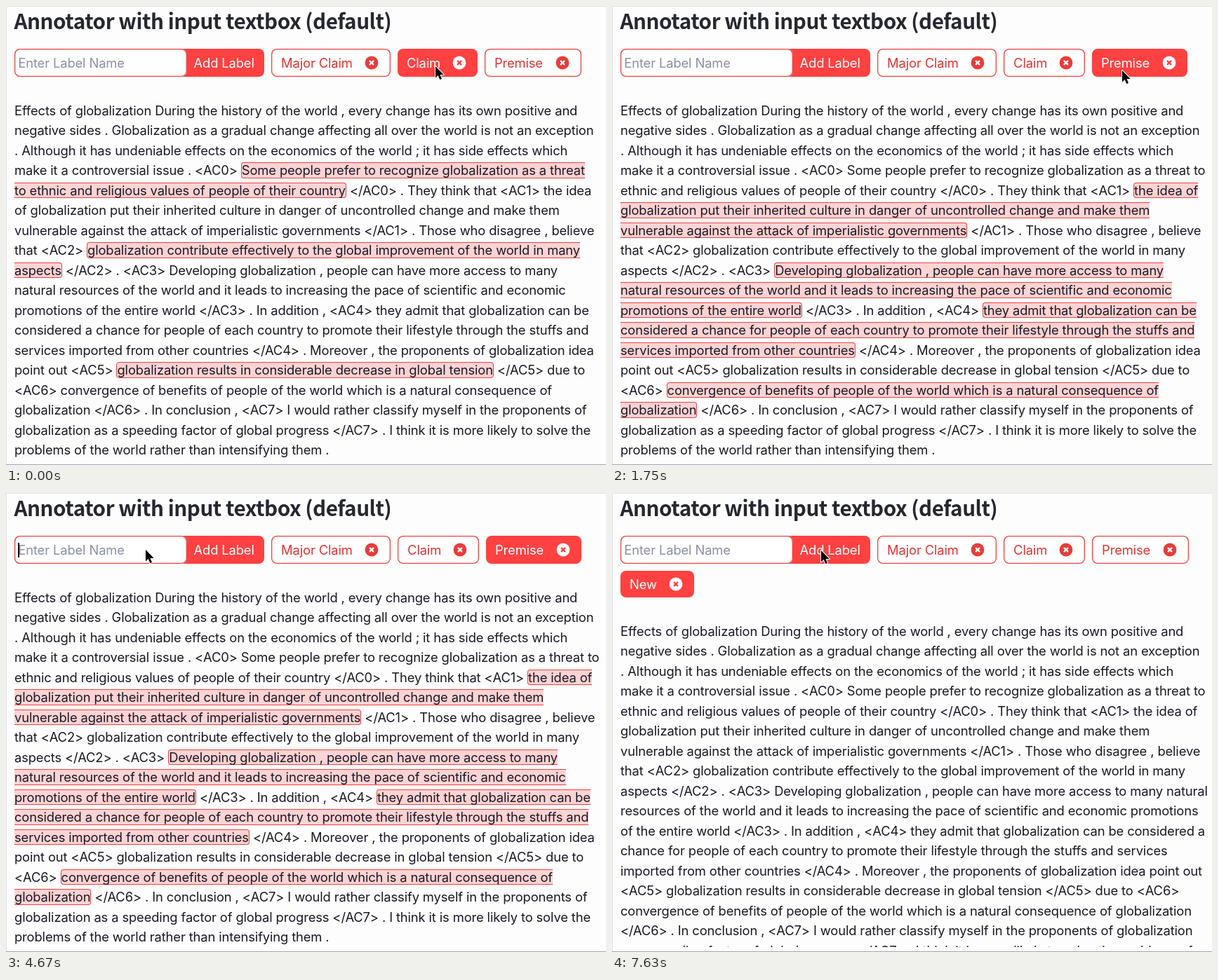
Recreate the animation shown at these times as an HTML page. Size 855 by 655 pixels, loop 7670 ms.

```html
<!DOCTYPE html>
<html lang="en">
<head>
<meta charset="utf-8">
<title>Annotator</title>
<style>
  :root { --red: #ff4141; --line: #ee4340; }
  html, body { margin: 0; width: 100%; height: 100%; overflow: hidden; background: #fdfdfd; }
  #stage {
    position: relative; width: 855px; height: 655px; overflow: hidden;
    font: 18.4px/28.53px Inter, "Liberation Sans", sans-serif;
    font-optical-sizing: none; font-feature-settings: "calt" 0;
    letter-spacing: -0.147px; color: #1a1a26; white-space: pre;
  }
  #stage > * { position: absolute; box-sizing: border-box; }
  #frame { inset: 0; border: solid #e2e1e8; border-width: 1px 0 0 1px; }
  #frame::after { content: ""; position: absolute; left: -1px; right: 0; bottom: 0; height: 1px; background: #a5a2ba; }
  #title { left: 0; top: 0; }
  #title text {
    font: 700 29.7px "Noto Sans CJK JP", "Noto Sans CJK SC", "Noto Sans", sans-serif;
    letter-spacing: -0.5px; fill: #262730;
  }
  #entry { left: 12px; top: 61px; width: 356px; height: 40px; border-radius: 8px; background: var(--red); line-height: 40px; color: #fff; }
  #entry span { position: absolute; left: 255.5px; }
  #field {
    position: absolute; left: 0; top: 0; width: 246px; height: 40px; box-sizing: border-box;
    padding-left: 5.3px; border-radius: 8px; background: #fff;
    box-shadow: inset 0 0 0 1.3px var(--line); color: #000;
  }
  #field.empty { color: #8b90a2; }
  #caret { position: absolute; top: 10px; width: 1.5px; height: 21px; background: #000; }
  .chip {
    height: 40px; line-height: 40px; padding-left: 14.1px; border-radius: 8px;
    color: #e33432; background: #fff; box-shadow: inset 0 0 0 1.3px var(--line);
  }
  .chip svg { position: absolute; right: 17.1px; top: calc(50% - 10px); }
  .chip circle { fill: #e93b39; }
  .chip path { stroke: #fff; stroke-width: 2.3; stroke-linecap: round; }
  .chip.fill { color: #fff; background: var(--red); box-shadow: none; }
  .chip.fill circle { fill: #fff; }
  .chip.fill path { stroke: var(--red); }
  .chip.picked { padding-left: 13px; }
  .chip.picked svg { right: 16px; }
  .page { left: 12px; right: 0; overflow: hidden; }
  .page p { margin: 0; height: 28.53px; }
  .page b {
    display: inline-block; box-sizing: border-box; height: 22.4px; line-height: 20.4px;
    font-weight: 400; background: #fdd3d3; border: solid var(--line); border-width: 1px 0;
  }
  .page b.start { border-left-width: 1px; border-radius: 4px 0 0 4px; }
  .page b.end { border-right-width: 1px; border-radius: 0 4px 4px 0; }
  .page b.start.end { border-radius: 4px; }
  #mouse { left: 0; top: 0; overflow: visible; }
  #mouse path { fill: #000; stroke: #fff; stroke-width: 2; stroke-linejoin: round; paint-order: stroke; }
</style>
</head>
<body>
<div id="stage">
  <div id="frame"></div>
  <svg id="title" width="855" height="50"><text x="11.5" y="33">Annotator with input textbox (default)</text></svg>
  <div id="entry"><span>Add Label</span><div id="field"></div></div>
</div>
<script>
const LOOP = 7670, PICK = 1450, FOCUS = 4200, ADD = 7400, HOVER_LAG = 60;
const KEYS = [[5150, "N"], [5400, "Ne"], [5800, "New"]];

// Pointer stops: time, x, y
const PATH = [
  [150, 612, 86], [900, 700, 98], [1300, 727, 92], [1800, 727, 92], [2350, 727, 96],
  [3580, 199, 81], [6350, 199, 81], [7050, 298, 82]
];

// "|012" ends a line in the layouts whose digits it holds
const TEXT = `Effects of globalization During the history of the world , every change has its own positive and |012
negative sides . Globalization as a gradual change affecting all over the world is not an exception |012
. Although it has undeniable effects on the economics of the world ; it has side effects which |012
make it a controversial issue . <AC0> Some people prefer to recognize globalization as a threat |0 to |12
ethnic and religious values of people of their country </AC0> . They think that <AC1> the idea |0 of |12
globalization put their inherited culture in danger of uncontrolled change and make them |012
vulnerable against the attack of imperialistic governments </AC1> . Those who disagree , believe |012
that <AC2> globalization contribute effectively to the global improvement of the world in many |012
aspects </AC2> . <AC3> Developing globalization , people can have more access to many |01 natural |2
resources of the world and it leads to increasing the pace of scientific and economic |01 promotions |2
of the entire world </AC3> . In addition , <AC4> they admit that globalization can be |01 considered a |2
chance for people of each country to promote their lifestyle through the stuffs and |01 services |2
imported from other countries </AC4> . Moreover , the proponents of globalization idea |01 point out |2
<AC5> globalization results in considerable decrease in global tension </AC5> due to |01 <AC6> |2
convergence of benefits of people of the world which is a natural consequence of |01 globalization |2
</AC6> . In conclusion , <AC7> I would rather classify myself in the proponents of |01 globalization |2
as a speeding factor of global progress </AC7> . I think it is more likely to solve the |01 problems of |2
the world rather than intensifying them .`;

const stage = document.getElementById("stage");
const field = document.getElementById("field");

function add(parent, tag, cls = "") {
  const el = document.createElement(tag);
  el.className = cls;
  parent.append(el);
  return el;
}

function makePage(layout, marked, top) {
  const page = add(stage, "div", "page");
  page.style.top = top + "px";
  page.style.height = 648.3 - top + "px";
  let line = add(page, "p"), mark = null;
  for (const word of TEXT.split(/\s+/)) {
    if (word[0] === "|") {
      if (!word.includes(layout)) continue;
      line = add(page, "p");
      if (mark) mark = add(line, "b");
      continue;
    }
    if (mark && word.startsWith("</")) {
      mark.classList.add("end");
      mark = null;
    }
    const host = mark || line;
    if (host.textContent) host.append(" ");
    host.append(word);
    if (word.startsWith("<A") && marked.includes(word[3])) {
      line.append(" ");
      mark = add(line, "b", "start");
    }
  }
  return page;
}

function makeChip(name, width) {
  const el = add(stage, "div", "chip");
  el.innerHTML = name + '<svg width="20" height="20"><circle cx="10" cy="10" r="9.4"/><path d="M7.6 7.6l4.8 4.8M12.4 7.6l-4.8 4.8"/></svg>';
  return { el, width };
}

const pages = [makePage(0, "025", 134.7), makePage(1, "1346", 134.7), makePage(2, "", 182.7)];
const chips = [makeChip("Major Claim", 170.4), makeChip("Claim", 116.4), makeChip("Premise", 138.2)];
const added = makeChip("New", 105).el;
added.classList.add("fill", "picked");
added.style.cssText = "left:12px;top:111px;width:105px;height:38px;line-height:38px";

stage.insertAdjacentHTML("beforeend",
  '<svg id="mouse" width="14" height="21"><path d="M0 0V16.4L3.7 13L6.3 19L9 17.9L6.5 12H11.7Z"/></svg>');
const mouse = document.getElementById("mouse");

const label = document.createElement("span");
label.style.cssText = "position:static";
const caret = document.createElement("i");
caret.id = "caret";
field.append(label, caret);

function pointerAt(t) {
  const i = PATH.findIndex(k => k[0] > t);
  if (i === 0) return PATH[0].slice(1);
  if (i < 0) return PATH.at(-1).slice(1);
  const [t0, x0, y0] = PATH[i - 1], [t1, x1, y1] = PATH[i];
  const u = (t - t0) / (t1 - t0), p = u * u * (3 - 2 * u);
  return [x0 + (x1 - x0) * p, y0 + (y1 - y0) * p];
}

function drawChips(t, state) {
  const [hx, hy] = pointerAt(Math.max(0, t - HOVER_LAG));
  let x = 378;
  chips.forEach(({ el, width }, i) => {
    const picked = i === state + 1;
    const w = picked ? width - 2.2 : width;
    const hover = hx >= x && hx <= x + w && hy >= 61 && hy <= 101;
    el.style.left = x + "px";
    el.style.top = "61px";
    el.style.width = w + "px";
    el.classList.toggle("picked", picked);
    el.classList.toggle("fill", picked || hover);
    x += w + 9.6;
  });
  added.style.visibility = state === 2 ? "visible" : "hidden";
}

function drawField(t) {
  const key = t < ADD && KEYS.findLast(k => k[0] <= t);
  const since = t - (key ? key[0] : FOCUS);
  label.textContent = key ? key[1] : "Enter Label Name";
  field.classList.toggle("empty", !key);
  const shown = t >= FOCUS && t < ADD && since % 1000 < 500;
  caret.style.visibility = shown ? "visible" : "hidden";
  caret.style.left = (key ? 5.3 + label.offsetWidth : 5.3) + "px";
}

function draw(now) {
  const t = now % LOOP;
  const state = t < PICK ? 0 : t < ADD ? 1 : 2;
  pages.forEach((p, i) => p.style.visibility = i === state ? "visible" : "hidden");
  drawChips(t, state);
  drawField(t);
  const [x, y] = pointerAt(t);
  mouse.style.transform = `translate(${x}px, ${y}px)`;
  mouse.style.visibility = t > KEYS[0][0] && t < 6350 ? "hidden" : "visible";
}

const begin = performance.now();
function tick() {
  draw(performance.now() - begin);
  requestAnimationFrame(tick);
}
tick();
</script>
</body>
</html>
```
